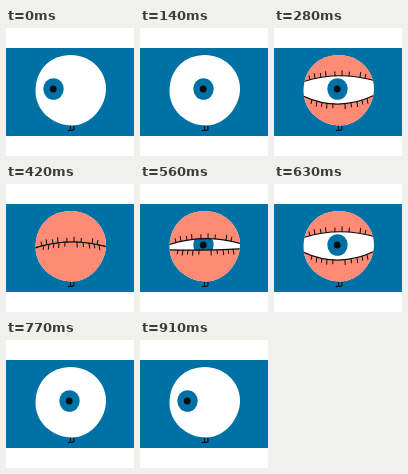
An HTML page with a canvas for the animation above (980 ms loop, 128 px wide and 128 px high).

```html
<!DOCTYPE html>
<html lang="en">
<head>
<meta charset="utf-8">
<title>Blinking eye</title>
<style>
  html, body { margin: 0; width: 100%; height: 100%; overflow: hidden; background: #fff; }
  canvas { display: block; width: 128px; height: 128px; }
</style>
</head>
<body>
<canvas></canvas>
<script>
const BLUE = '#0071a5', CORAL = '#ff8b75', INK = '#0b0b10';
const STEP = 70, STEPS = 14;
const LEFT = 29, RIGHT = 101;
const upperLashes = [36, 41, 47, 52, 61, 68, 75, 86, 91];
const lowerLashes = [38, 43, 48, 53, 59, 71, 77, 83, 88, 93];
const body = new Path2D('M65 27C83 27 100 41 100 61C100 78 85 97.5 66 97.5C46 97.5 29.5 82 29.5 63C29.5 41 45 27 65 27Z');
const feet = new Path2D('M64.3 97.5L64.8 102L62.3 102.6M67.8 97L68 101.6L65.8 102.6');

const canvas = document.querySelector('canvas');
const ctx = canvas.getContext('2d');
const ratio = window.devicePixelRatio || 1;
canvas.width = canvas.height = 128 * ratio;
ctx.scale(ratio, ratio);
ctx.lineCap = 'round';

function fill(path, color) {
  ctx.fillStyle = color;
  ctx.fill(path);
}

function stroke(path, width) {
  ctx.strokeStyle = INK;
  ctx.lineWidth = width;
  ctx.stroke(path);
}

function oval(x, y, rx, ry, color) {
  const path = new Path2D();
  path.ellipse(x, y, rx, ry, 0, 0, Math.PI * 2);
  fill(path, color);
}

// A lid covers the body from its parabolic edge outwards; side is -1 for the upper one.
function drawLid(left, middle, right, side, lashes) {
  const control = 2 * middle - (left + right) / 2;
  const edge = new Path2D();
  edge.moveTo(LEFT, left);
  edge.quadraticCurveTo((LEFT + RIGHT) / 2, control, RIGHT, right);

  const skin = new Path2D(edge);
  const far = 64 + side * 64;
  skin.lineTo(RIGHT, far);
  skin.lineTo(LEFT, far);
  fill(skin, CORAL);
  stroke(edge, 1.2);

  const hairs = new Path2D();
  lashes.forEach((x, i) => {
    const u = (x - LEFT) / (RIGHT - LEFT), v = 1 - u;
    const y = v * v * left + 2 * u * v * control + u * u * right;
    hairs.moveTo(x, y);
    hairs.lineTo(x + (x - 65) / 30, y + side * (4 + i % 2));
  });
  stroke(hairs, 1);
}

// open runs from 0 (shut) to 1 (lids out of sight)
function drawLids(open) {
  const lift = 31 * open ** 1.6;
  const drop = 40 * open ** 1.15;
  const sag = drop * 0.22;
  drawLid(64 - lift, 58 - lift, 63 - lift, -1, upperLashes);
  drawLid(64 + sag, 58 + drop, 63 + sag, 1, lowerLashes);
}

function draw(pose) {
  ctx.fillStyle = '#fff';
  ctx.fillRect(0, 0, 128, 128);
  ctx.fillStyle = BLUE;
  ctx.fillRect(0, 20, 128, 88);
  stroke(feet, 1.1);
  fill(body, '#fff');

  const x = 47.5 + 8 * Math.min(pose, 2);
  ctx.save();
  ctx.clip(body);
  oval(x, 61, 10.2, 10.8, BLUE);
  oval(x - 0.3, 61, 3.4, 3.5, INK);
  if (pose > 2) drawLids((6 - pose) / 4);
  ctx.restore();
}

function tick(now) {
  const step = Math.floor(now / STEP) % STEPS;
  draw(Math.min(step, STEPS - 1 - step));
  requestAnimationFrame(tick);
}

tick(performance.now());
</script>
</body>
</html>
```
